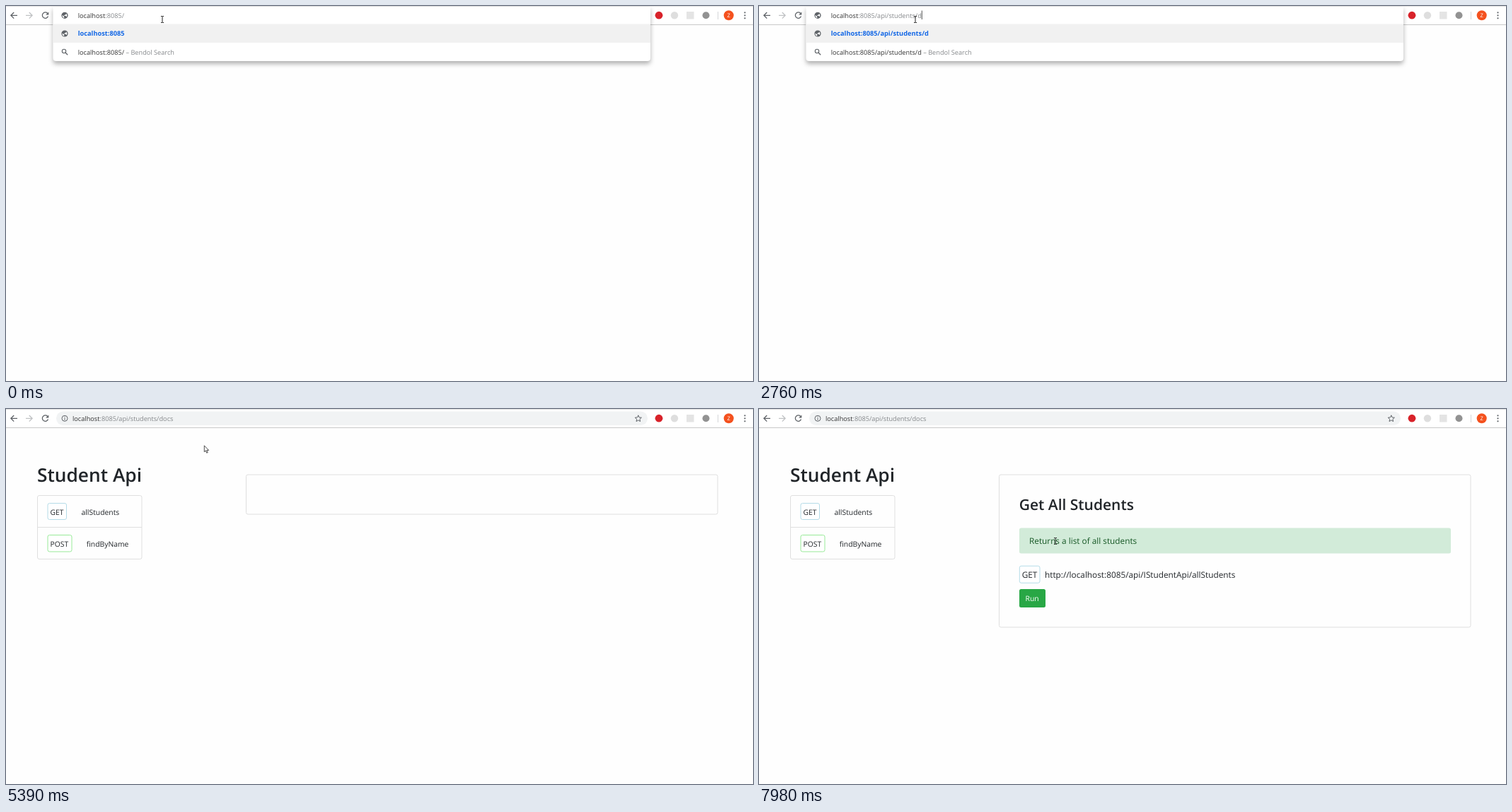
An HTML page that plays this animation: 1056 px wide and 531 px high, repeating every 8000 ms.

```html
<!DOCTYPE html>
<html lang="en">
<head>
<meta charset="utf-8">
<title>Student Api docs</title>
<style>
  html, body { margin: 0; width: 100%; height: 100%; overflow: hidden; background: #fefefe; }
  svg { display: block; width: 100vw; height: 100vh; }
  text { font-family: "Open Sans", "Noto Sans", sans-serif; white-space: pre; text-rendering: geometricPrecision; fill: #212529; }
  .bar text { font-size: 9.2px; fill: #333; }
  .bar .dim, .dim { fill: #85888b; }
  .bar .hit { font-size: 9.25px; font-weight: 700; fill: #1267e6; }
  .small { font-size: 10.35px; }
  .body { font-size: 11.8px; }
  .h1 { font-size: 26.3px; font-weight: 600; }
  .h2 { font-size: 21px; font-weight: 600; }
  .line { fill: none; stroke: #5f6368; stroke-width: 1.3; }
  .frame { fill: none; stroke: #dfdfdf; }
  .get { fill: #fff; stroke: #b5dce8; }
  .post { fill: #fff; stroke: #98ea98; }
  .drop { filter: drop-shadow(0 4px 3px rgba(0, 0, 0, .3)); }
</style>
</head>
<body>
<svg viewBox="0 0 1056 531" preserveAspectRatio="none">
  <defs>
    <clipPath id="selClip"><rect id="selBox" x="44" y="73" width="0" height="37"/></clipPath>
    <g id="globe">
      <circle r="4.6" fill="#5f6368"/>
      <path d="M-3.4-.6L-.8 1.6V3.6C-2.6 3.2-3.6 1.6-3.4-.6ZM.2-3.5L2.4-2.6 1-.8-.8-.3-.6 .8 1.6 .8 2.6 2.2C4 .4 3.4-2.6 .2-3.5Z" fill="#fff"/>
    </g>
  </defs>
  <rect width="1056" height="531" fill="#fefefe"/>

  <g id="page">
    <rect class="frame" x="44.5" y="122.5" width="147.5" height="90" rx="2.5"/>
    <rect id="hover" x="45" y="123" width="147" height="44.5" fill="#f5f5f5"/>
    <path id="rule" class="frame" d="M44.5 167.5H192"/>
    <text id="title" class="h1" x="44" y="102.5">Student Api</text>
    <g id="sel">
      <use href="#selBox" fill="#3390ff"/>
      <text class="h1" x="44" y="102.5" clip-path="url(#selClip)" style="fill:#fff">Student Api</text>
    </g>
    <g class="small">
      <rect id="getTag" class="get" x="59" y="133.5" width="26.5" height="23" rx="2.5"/>
      <text x="62.5" y="149.7">GET</text>
      <text x="106.5" y="149.7">allStudents</text>
      <rect class="post" x="59" y="178.5" width="34" height="23.5" rx="2.5"/>
      <text x="62.5" y="194.7">POST</text>
      <text x="113.7" y="194.7">findByName</text>
    </g>
    <rect id="panel" class="frame" x="339.5" y="93" width="666.5" height="56" rx="2.5"/>
    <g id="detail">
      <text class="h2" x="367.7" y="142.7">Get All Students</text>
      <rect x="368" y="168.5" width="610" height="36" rx="2.5" fill="#d2ebd9"/>
      <text class="body" x="382" y="191" style="fill:#155724">Returns a list of all students</text>
      <rect class="get" x="368.3" y="222.3" width="28.7" height="24" rx="2.5"/>
      <text class="body" x="371.7" y="239.2">GET</text>
      <text class="body" x="404" y="239.2">http://localhost:8085/api/IStudentApi/allStudents</text>
      <rect x="368" y="255" width="37" height="26" rx="2.5" fill="#28a745"/>
      <text class="small" x="376.6" y="272.3" style="fill:#fff">Run</text>
    </g>
  </g>

  <g class="bar">
    <rect width="1056" height="26" fill="#fff"/>
    <path d="M0 .5H1056" stroke="#e2e2e2"/>
    <path d="M0 26.5H1056" stroke="#c9c9c9"/>
    <path class="line" d="M16 13.3H7M11.2 9L6.9 13.3 11.2 17.6"/>
    <path class="line" d="M28 13.3H37M32.8 9L37.1 13.3 32.8 17.6" style="stroke:#c0c2c4"/>
    <g id="reload">
      <path class="line" d="M58.6 10.2A4.2 4.2 0 1 0 59.5 14.6"/>
      <path d="M60.3 8.4V12.6H56.1Z" fill="#5f6368"/>
    </g>
    <path id="stop" class="line" d="M51.5 9.5L59.5 17.5M59.5 9.5L51.5 17.5"/>

    <g id="closed">
      <rect x="71" y="3.5" width="836" height="19.5" rx="9.7" fill="#f1f3f4"/>
      <circle class="line" cx="83" cy="13.3" r="4" style="stroke-width:1"/>
      <path d="M83 12.7V15.6M83 10.8V11.8" stroke="#5f6368"/>
      <path class="line" d="M893.8 8.8L895.1 11.9 898.4 12.2 895.9 14.4 896.6 17.6 893.8 15.9 891 17.6 891.7 14.4 889.2 12.2 892.5 11.9Z" style="stroke-width:1"/>
      <text x="94" y="16.6">localhost<tspan class="dim">:8085/api/students/docs</tspan></text>
    </g>

    <circle cx="923" cy="13.2" r="5.4" fill="#d8222a"/>
    <circle cx="945" cy="13.2" r="5.2" fill="#dedede"/>
    <rect x="962" y="8" width="10.5" height="10.5" fill="#e4e4e4"/>
    <circle cx="989.5" cy="13.2" r="5" fill="#929292"/>
    <path d="M1006.5 8V19" stroke="#d5d7d9"/>
    <circle cx="1021.7" cy="13.2" r="7" fill="#f4511e"/>
    <text x="1021.7" y="16" text-anchor="middle" style="font-size:7.6px;fill:#fff">Z</text>
    <g fill="#5f6368"><circle cx="1044.5" cy="9.3" r="1.1"/><circle cx="1044.5" cy="13.3" r="1.1"/><circle cx="1044.5" cy="17.3" r="1.1"/></g>

    <g id="open">
      <path class="drop" d="M66.5 1H911V73.500Q911 78 906.500 78H71Q66.500 78 66.500 73.500Z" fill="#fff"/>
      <rect x="66.500" y="25.500" width="844.500" height="26.500" fill="#f1f1f1"/>
      <use href="#globe" x="83" y="13.3"/>
      <use href="#globe" x="83" y="39"/>
      <circle class="line" cx="82" cy="64" r="2.7" style="stroke-width:1.1"/>
      <path class="line" d="M84 66L87.200 69.200"/>
      <text id="typed" x="101.700" y="16.600">localhost<tspan id="rest" class="dim"></tspan></text>
      <text id="hit" class="hit" x="101.700" y="42.200"></text>
      <text x="101.700" y="68.600"><tspan id="query"></tspan><tspan class="dim"> – Bendol Search</tspan></text>
      <rect id="caret" y="6.500" width="1" height="12.500" fill="#555"/>
    </g>
  </g>

  <g id="cursor">
    <path id="arrow" d="M.3 .3V9.200L2.300 7.400 3.700 10.700 5.200 10.100 3.800 6.900H6.600Z" fill="#fff" stroke="#222" stroke-width=".8"/>
    <path id="beam" d="M-2-4.500H-.5L0-4 .5-4.500H2M0-4V4M-2 4.500H-.5L0 4 .5 4.500H2" fill="none" stroke="#222" stroke-width="1"/>
    <path id="hand" d="M-.9 7.800V.8Q-.9-.3 .1-.3T1.100 .8V4.300L4.600 5Q5.600 5.300 5.500 6.400L4.700 10.100V12.200H-.3V10.600L-3 7.200Q-2.600 5.900-.9 7.800Z" fill="#fff" stroke="#222" stroke-width=".9"/>
  </g>
</svg>
<script>
const LOOP = 8000, SUBMIT = 3360, PAGE = 4230, LOADED = 4360, DETAIL = 6790;
const DRAG = 5670, DESELECT = 6200;
const PATH = "api/students/docs";
// time, letters typed
const KEYS = [[370, 1], [450, 2], [540, 3], [770, 4], [950, 5], [1090, 6], [1170, 7], [1310, 8],
  [1440, 9], [1480, 10], [1570, 11], [1750, 12], [1800, 13], [2670, 14], [2780, 16], [2890, 17]];
// time, x, y of the pointer
const MOVES = [[0, 221, 19], [4049, 221, 19], [4050, 225, 18], [4100, 225, 18], [4101, 228, 18],
  [4510, 228, 18], [4550, 231, 20], [4750, 270, 45], [4950, 360, 95], [5070, 401, 116],
  [5190, 392, 112], [5350, 323, 72], [5390, 280, 51.5], [5470, 190, 62], [5590, 47, 92],
  [5670, 47, 92], [5950, 190, 96], [5990, 205.5, 97], [6190, 205.5, 97], [6430, 157.5, 138],
  [6990, 157.5, 138], [7030, 160, 137], [7190, 200, 132], [7450, 290, 150], [7710, 357, 175],
  [7790, 370, 180], [7830, 370, 180], [7950, 419, 187]];

const el = {};
document.querySelectorAll("[id]").forEach(n => el[n.id] = n);
const show = (node, on) => node.style.display = on ? "" : "none";
const within = (x, y, l, t, r, b) => x >= l && x <= r && y >= t && y <= b;

function pointer(t) {
  const q = t < 4500 ? t : Math.floor((t - 30) / 40) * 40 + 30; // pointer is sampled every 40 ms
  const i = MOVES.findIndex(m => m[0] > q);
  if (i < 0) return MOVES[MOVES.length - 1].slice(1);
  const [t0, x0, y0] = MOVES[i - 1], [t1, x1, y1] = MOVES[i];
  const k = (q - t0) / (t1 - t0);
  return [x0 + (x1 - x0) * k, y0 + (y1 - y0) * k];
}

function cursorKind(x, y, t) {
  if (y < 23) return "beam";
  if (t < PAGE) return "arrow";
  if (within(x, y, 44, 73, 192, 110)) return "beam";
  if (within(x, y, 45, 123, 192, 212)) return "hand";
  if (t >= DETAIL && within(x, y, 382, 179, 534, 196)) return "beam";
  return "arrow";
}

function typing(t) {
  const count = KEYS.reduce((n, [at, c]) => t >= at ? c : n, 0);
  const rest = ":8085/" + PATH.slice(0, count);
  el.rest.textContent = rest;
  el.query.textContent = "localhost" + rest;
  el.hit.textContent = "localhost" + (count ? rest : ":8085");
  show(el.caret, t >= 370 && t < 2310 || t >= 2670);
  el.caret.setAttribute("x", 101.7 + el.typed.getComputedTextLength());
}

// right edge of the selection, snapped to whole letters
function selectionEnd(x) {
  let end = 44;
  for (let i = 0; i < el.title.getNumberOfChars(); i++) {
    const a = el.title.getStartPositionOfChar(i).x, b = el.title.getEndPositionOfChar(i).x;
    if (x > (a + b) / 2) end = b;
  }
  return end;
}

function draw(t) {
  const [x, y] = pointer(t), kind = cursorKind(x, y, t);
  const open = t < SUBMIT, loading = !open && t < LOADED;
  show(el.open, open);
  show(el.closed, !open);
  show(el.stop, loading);
  show(el.reload, !loading);
  if (open) typing(t);

  show(el.page, t >= PAGE);
  show(el.detail, t >= DETAIL);
  el.panel.setAttribute("height", t >= DETAIL ? 216 : 56);
  const selecting = t >= DRAG && t < DESELECT;
  show(el.sel, selecting);
  if (selecting) el.selBox.setAttribute("width", selectionEnd(x) - 44);
  const hover = kind === "hand" && y < 168;
  show(el.hover, hover);
  el.rule.style.stroke = hover ? "#cdcdcd" : "";
  el.getTag.style.fill = hover ? "#f5f5f5" : "";

  el.cursor.setAttribute("transform", `translate(${x} ${y})`);
  for (const k of ["arrow", "beam", "hand"]) show(el[k], k === kind);
}

function tick() {
  draw(performance.now() % LOOP);
  requestAnimationFrame(tick);
}
tick();
</script>
</body>
</html>
```
